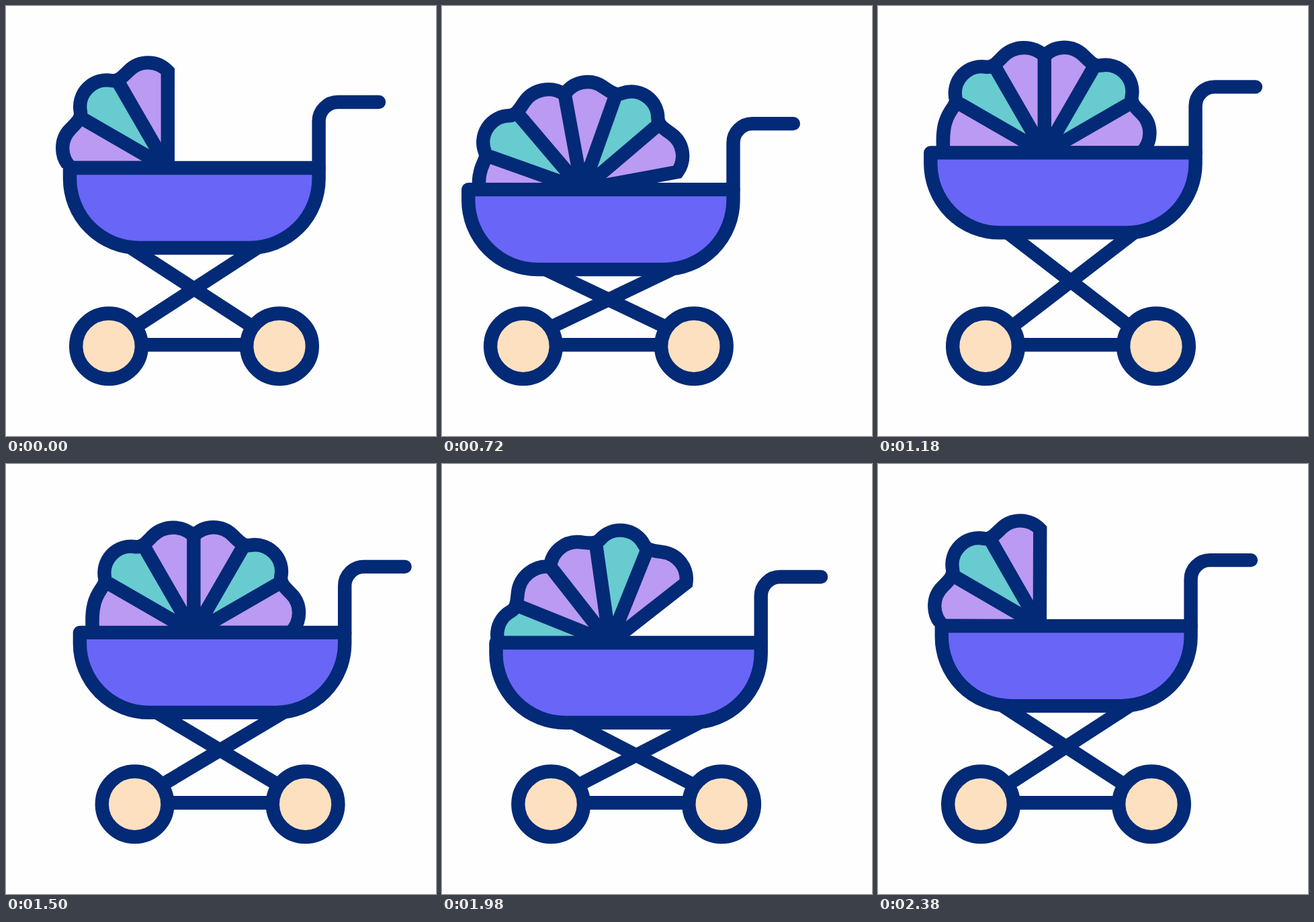
Animation of 640x640 px, one loop 2.4 s. Source, as an HTML page:

```html
<!DOCTYPE html>
<html lang="en">
<head>
<meta charset="utf-8">
<title>Baby carriage</title>
<style>
  html, body { margin: 0; width: 100%; height: 100%; overflow: hidden; background: #fefefe; }
  svg { display: block; width: 100vw; height: 100vh; }
  .line { fill: none; stroke: #032a76; stroke-width: 20.4; }
  .teal { fill: #67cbd0; }
</style>
</head>
<body>
<svg viewBox="0 0 640 640">
  <defs>
    <clipPath id="above"><rect x="-300" y="-300" width="700" height="300"/></clipPath>
  </defs>
  <g id="cart">
    <path id="legs" class="line"/>
    <path class="line" d="M50 504.2H204"/>
    <g id="top">
      <g clip-path="url(#above)">
        <g id="hood">
          <path id="fan" fill="#ba9af2"/>
          <path class="teal" d="M0 0L-74 -128 -84 -130A39.6 39.6 0 0 0 -130 -84L-128 -74Z"/>
          <path class="teal" transform="rotate(-91.2)" d="M0 0L-74 -128 -84 -130A39.6 39.6 0 0 0 -130 -84L-128 -74Z"/>
          <path id="ribs" class="line"/>
          <path id="rim" class="line"/>
        </g>
      </g>
      <path id="basket" class="line" style="fill:#6965f6" stroke-linejoin="round"/>
      <path class="line" stroke-linecap="round" d="M312.6 0V-69.5A28.5 28.5 0 0 1 341.1 -98H402"/>
    </g>
    <g class="line" style="fill:#fde0bf">
      <circle cx="0" cy="506.3" r="48.8"/>
      <circle cx="254" cy="506.3" r="48.8"/>
    </g>
  </g>
</svg>
<script>
  const LOOP = 2400;
  const el = id => document.getElementById(id);
  const set = (id, name, value) => el(id).setAttribute(name, value);

  // Keys are [time, value]; each span eases in and out.
  const moveX = [[0, 153], [800, 120], [1507, 191.6], [2200, 153], [LOOP, 153]];
  const moveY = [[0, 241], [630, 277], [1212, 217.9], [1745, 276.5], [LOOP, 241]];
  const turn = [[0, 0], [915, 90], [1640, 90], [LOOP, 0]];
  const leftEdge = [[0, -58], [333, -81.7], [2067, -81.7], [LOOP, -58]];

  function at(keys, t) {
    let i = 1;
    while (i < keys.length - 1 && t > keys[i][0]) i++;
    const [t0, a] = keys[i - 1], [t1, b] = keys[i];
    const u = Math.min(1, (t - t0) / (t1 - t0));
    return a + (b - a) * u * u * (3 - 2 * u);
  }

  // Rotates a flat list of coordinates about the hinge.
  function spin(deg, ...xy) {
    const a = deg * Math.PI / 180, c = Math.cos(a), s = Math.sin(a), out = [];
    for (let i = 0; i < xy.length; i += 2) {
      const x = xy[i], y = xy[i + 1];
      out.push((x * c - y * s).toFixed(2), (x * s + y * c).toFixed(2));
    }
    return out.join(' ');
  }

  const arc = (r, end) => `A${r} ${r} 0 0 0 ${end}`;

  // Two lobes and the soft notch between them.
  const lobes = (deg, r) =>
    arc(r, spin(deg, -58, -144.8)) +
    'C' + spin(deg, -68, -135, -74, -128.2, -84, -130) +
    arc(39.6, spin(deg, -130, -84));

  const rim = 'M0 0L0 -144' + lobes(0, 40.5) +
    'C' + spin(0, -128.2, -74, -135, -68, -144.8, -58) +
    arc(40.5, '-144 0') + lobes(-91.5, 44) +
    'C' + spin(-90, -130, -71, -139, -67, -145, -52) +
    'C' + spin(-90, -151.5, -38, -152, -20, -150, 6);

  let ribs = '';
  for (let d = 30; d <= 150; d += 30) ribs += 'M0 0L' + spin(-d, 0, -146);

  set('fan', 'd', rim);
  set('rim', 'd', rim);
  set('ribs', 'd', ribs);

  function draw(t) {
    const y = at(moveY, t), left = at(leftEdge, t), base = y + 119;
    set('cart', 'transform', `translate(${at(moveX, t)} 0)`);
    set('top', 'transform', `translate(0 ${y})`);
    set('hood', 'transform', `translate(87.8 0) rotate(${at(turn, t)})`);
    set('legs', 'd', `M33 ${base}L221 482M221 ${base}L33 482`);
    set('basket', 'd',
      `M${left} 0H312.6V16A103 103 0 0 1 209.6 119H${left + 103}A103 103 0 0 1 ${left} 16Z`);
  }

  const start = performance.now();
  function tick() {
    draw((performance.now() - start) % LOOP);
    requestAnimationFrame(tick);
  }
  draw(0);
  requestAnimationFrame(tick);
</script>
</body>
</html>
```
